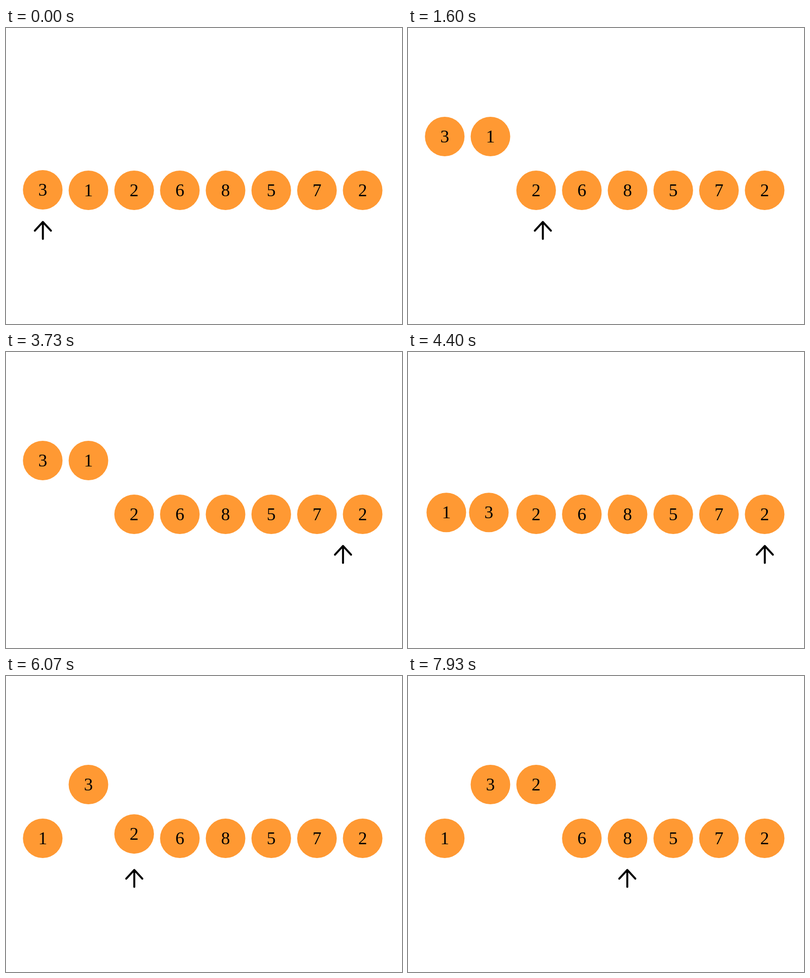
An HTML page with a canvas for the animation above (8000 ms loop, 800x600 px).

```html
<!DOCTYPE html>
<html>
<head>
<meta charset="utf-8">
<style>
html, body { margin: 0; width: 100%; height: 100%; overflow: hidden; background: #fff; }
canvas { display: block; }
</style>
</head>
<body>
<canvas id="stage" width="800" height="600"></canvas>
<script>
const ctx = document.getElementById("stage").getContext("2d");
const LOOP = 8000, STEP = 500, FPS = 15;
const LEAD = 34; // the first step is already running when the loop starts
const LOW = 329, LIFT = 109, RADIUS = 40;
const values = [3, 1, 2, 6, 8, 5, 7, 2];

const slotX = i => 74.2 + 92.33 * i;
const ease = p => p < 0.5 ? 2 * p * p : 1 - 2 * (1 - p) * (1 - p);
const mix = (a, b, p) => a + (b - a) * p;

// Each track lists [step, value reached during that step].
function track(start, moves, time) {
  let v = start;
  for (const [step, to] of moves) {
    const p = time / STEP - step;
    if (p <= 0) break;
    v = mix(v, to, ease(Math.min(p, 1)));
  }
  return v;
}

const arrowMoves = [
  [1, 1], [2, 2], [3, 3], [4, 4], [5, 5], [6, 6], [7, 7],
  [9, 1], [11, 2], [14, 3], [15, 4]
];
const ballMoves = [
  { slot: [[8, 1]], lift: [[0, 1], [8, 0], [10, 1]] },
  { slot: [[8, 0]], lift: [[2, 1], [8, 0]] },
  { slot: [], lift: [[12, 1]] }
];
const still = { slot: [], lift: [] };

function drawBall(value, x, y) {
  ctx.fillStyle = "#ff9933";
  ctx.beginPath();
  ctx.arc(x, y, RADIUS, 0, Math.PI * 2);
  ctx.fill();
  ctx.fillStyle = "#000";
  ctx.fillText(value, x, y + 12);
}

function drawArrow(x) {
  ctx.beginPath();
  ctx.moveTo(x, 427.6);
  ctx.lineTo(x, 393.2);
  ctx.moveTo(x - 16.3, 410.8);
  ctx.lineTo(x, 393.2);
  ctx.lineTo(x + 16.3, 410.8);
  ctx.stroke();
}

function draw(time) {
  ctx.fillStyle = "#fff";
  ctx.fillRect(0, 0, 800, 600);
  ctx.font = "36px 'Liberation Serif', 'Times New Roman', serif";
  ctx.textAlign = "center";
  ctx.lineWidth = 4;
  ctx.lineCap = ctx.lineJoin = "round";
  ctx.strokeStyle = "#000";
  values.forEach((value, i) => {
    const { slot, lift } = ballMoves[i] || still;
    drawBall(value, slotX(track(i, slot, time)), LOW - LIFT * track(0, lift, time));
  });
  drawArrow(slotX(track(0, arrowMoves, time)) + 0.3);
}

// Hold each picture for one tick, with tick starts rounded to 10 ms.
function tick(ms) {
  const hundredths = Math.floor(ms / 10) + 0.5;
  return Math.floor(hundredths * FPS / 100);
}

function loop() {
  draw(tick(performance.now() % LOOP) * 1000 / FPS + LEAD);
  requestAnimationFrame(loop);
}
loop();
</script>
</body>
</html>
```
